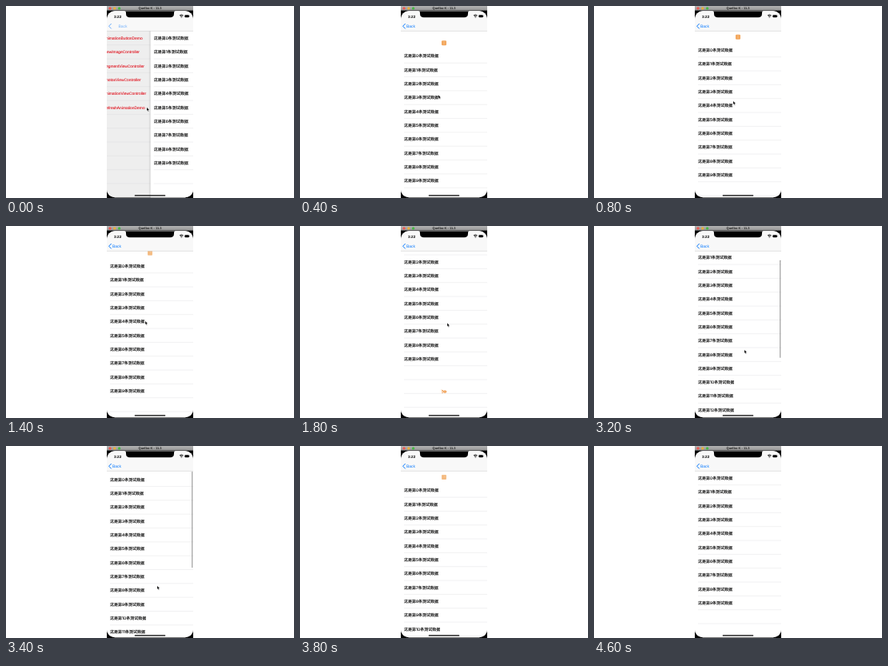
These frames come from a looping animation (360x240 px, 4.8 s). An HTML page:

```html
<!DOCTYPE html>
<html lang="zh-CN">
<head>
<meta charset="utf-8">
<title>Pull to refresh list</title>
<style>
  html, body { margin: 0; width: 100%; height: 100%; overflow: hidden; background: #fff; }
  svg { display: block; width: 360px; height: 240px; }
  text { font-family: "Liberation Sans", Inter, sans-serif; text-rendering: geometricPrecision; }
  .row { font: 5px Inter, "Noto Sans CJK SC", "Noto Sans CJK", sans-serif; stroke: #000; stroke-width: .1; }
  .menu { font-size: 4.9px; fill: #e0101c; stroke: #e0101c; stroke-width: .08; }
  .line { stroke: #cfced2; stroke-width: .3; }
  .bold { font-weight: 700; }
</style>
</head>
<body>
<svg viewBox="0 0 360 240">
  <defs>
    <clipPath id="screen"><rect x="126" y="6.3" width="108" height="232.9" rx="10"/></clipPath>
    <linearGradient id="bar" x2="0" y2="1">
      <stop stop-color="#b2b2b2"/><stop offset="1" stop-color="#969696"/>
    </linearGradient>
    <linearGradient id="shade">
      <stop stop-color="#000" stop-opacity="0"/><stop offset="1" stop-color="#000" stop-opacity=".13"/>
    </linearGradient>
    <g id="full">
      <rect x="-3" y="-3" width="6" height="6" rx="1.2" fill="#f2a65c"/>
      <path d="M-1.5-1.2h3M-1.5 .9h3" stroke="#f6bb80" stroke-width=".8"/>
    </g>
    <g id="pale">
      <rect x="-3" y="-3" width="6" height="6" rx="1" fill="#f5c08a"/>
      <path d="M-1.8-.8h1.8M-1.8 1.2h3.6" stroke="#f2b071" stroke-width=".8"/>
    </g>
    <g id="flat" fill="none" stroke="#f0984a">
      <path d="M-3-2.3l1 1.2v3.4M-2-.8l1-1.2" stroke-width=".9"/>
      <rect x="-.6" y="-1" width="3.4" height="2.2" rx=".9" fill="#f6bd85"/>
    </g>
  </defs>

  <rect x="126" y="5" width="108" height="235"/>
  <g clip-path="url(#screen)">
    <rect x="126" y="6" width="108" height="234" fill="#fff"/>
    <g id="menu">
      <rect x="126" y="31" width="108" height="209" fill="#eee"/>
    </g>
    <g id="page">
      <rect id="edge" x="123.5" y="31" width="2.5" height="209" fill="url(#shade)"/>
      <rect x="126" y="31" width="108" height="209" fill="#fff"/>
      <g id="list"></g>
      <use id="icon"/>
    </g>
    <rect id="scroll" x="232.3" width="1" rx=".5" fill="#8c8c8c"/>
    <rect x="126" y="6" width="108" height="25.3" fill="#f8f8f8"/>
    <path d="M126 31.4h108" stroke="#b5b5b5" stroke-width=".35"/>
    <path d="M148 6.3q2 0 2 2v1.2q0 4.7 4.7 4.7h50.6q4.7 0 4.7-4.7V8.3q0-2 2-2z"/>
    <text class="bold" x="135" y="14.6" font-size="4.6">3:22</text>
    <path d="M217 11.9q2.3-2.1 4.6 0M217.9 13q1.4-1.2 2.8 0" fill="none" stroke="#000" stroke-width=".9"/>
    <circle cx="219.3" cy="14" r=".6"/>
    <rect x="223.4" y="11.3" width="5.4" height="2.9" rx=".8"/>
    <path d="M229.2 12.2v1" stroke="#000" stroke-width=".5"/>
    <path id="chevron" d="M131.7 22l-3.1 3.2 3.1 3.2" fill="none" stroke="#0a7aff" stroke-width="1"/>
    <text id="back" y="27" font-size="5" fill="#0a7aff">Back</text>
    <rect x="160.7" y="236.3" width="38.6" height="1.3" rx=".65"/>
  </g>

  <rect x="126" width="108" height="5.6" fill="url(#bar)"/>
  <circle cx="130" cy="2.9" r="1.7" fill="#ee574f"/>
  <circle cx="135.8" cy="2.9" r="1.7" fill="#e9ae38"/>
  <circle cx="141.6" cy="2.9" r="1.7" fill="#46b845"/>
  <text class="bold" x="180" y="4.4" font-size="4" fill="#222" text-anchor="middle">Quelbo K - 11.3</text>
  <path id="cursor" d="M0-2.2V2.1l1-.9.8 1.7.7-.3-.8-1.7h1.4z" stroke="#fff" stroke-width=".25"/>
</svg>

<script>
const STEP = 200, LOOP = 4800, TOP = 31.4, ROW = 17.33;
const LOADED = 14, RESET = 23;

// list offset, cursor x, cursor y (no cursor when left out)
const steps = [
  [0, 176, 129], [0, 175, 104], [22.5, 173, 113.5], [21, 174, 121],
  [15, 174, 121], [15, 174, 121], [15, 174, 121], [10, 174, 121],
  [0, 184, 170], [-30, 184, 123.5], [-13, 184, 123.5], [-13, 184, 123.5],
  [-13, 184, 123.5], [-13, 184, 123.5], [-13, 184, 123.5], [-28, 188, 147],
  [-18, 188, 157], [1.8, 189, 177], [24, 189, 205], [15.4],
  [15], [15], [15], [0]
];
const menuItems = ["AnimationButtonDemo", "ViewImageController", "SegmentViewController",
  "PhotosViewController", "AnimationViewController", "RefreshAnimationDemo"];

const $ = id => document.getElementById(id);

function add(parent, tag, attrs, text = "") {
  const node = document.createElementNS("http://www.w3.org/2000/svg", tag);
  for (const key in attrs) node.setAttribute(key, attrs[key]);
  node.textContent = text;
  parent.append(node);
  return node;
}

function addLine(parent, i, x) {
  const y = TOP + ROW * (i + 1);
  add(parent, "line", { class: "line", x1: x, x2: 234, y1: y, y2: y });
}

const baseline = i => TOP + ROW * (i + .5) + 1.8;

for (let i = 0; i < 12; i++) {
  addLine($("menu"), i, 126);
  if (menuItems[i]) add($("menu"), "text", { class: "menu", x: 121.7, y: baseline(i) }, menuItems[i]);
}
const labels = [];
for (let i = 0; i < 20; i++) {
  addLine($("list"), i, 130);
  labels.push(add($("list"), "text", { class: "row", x: 130, y: baseline(i) }, `这是第${i}条测试数据`));
}

const show = (id, on) => $(id).setAttribute("display", on ? "inline" : "none");
const move = (id, x, y) => $(id).setAttribute("transform", `translate(${x} ${y})`);

function drawIcon(n, offset) {
  const footer = n > 8 && n < LOADED;
  show("icon", footer || offset > 5);
  const pale = n > 3 && n % 2 === 1;
  $("icon").setAttribute("href", footer ? "#flat" : pale ? "#pale" : "#full");
  move("icon", 180, (footer ? 237 : 23.7) + offset);
}

function drawScroll(n, offset) {
  show("scroll", n > LOADED && n < 19);
  $("scroll").setAttribute("y", 32 + Math.max(0, -offset) * .6);
  $("scroll").setAttribute("height", 122 - Math.max(0, offset));
}

function draw(n) {
  const [offset, x, y] = steps[n];
  const pushing = n === 0;
  show("menu", pushing);
  show("edge", pushing);
  move("page", pushing ? 54.7 : 0, 0);
  move("list", 0, offset);
  const count = n >= LOADED && n < RESET ? 20 : 10;
  labels.forEach((label, i) => label.setAttribute("display", i < count ? "inline" : "none"));
  $("back").setAttribute("x", pushing ? 140.5 : 133);
  $("back").setAttribute("opacity", pushing ? .55 : 1);
  $("chevron").setAttribute("opacity", pushing ? .6 : 1);
  drawIcon(n, offset);
  drawScroll(n, offset);
  show("cursor", x !== undefined);
  if (x !== undefined) move("cursor", x, y);
}

const start = performance.now();
let last = -1;
function tick() {
  const n = Math.floor((performance.now() - start) % LOOP / STEP);
  if (n !== last) draw(last = n);
  requestAnimationFrame(tick);
}
tick();
</script>
</body>
</html>
```
